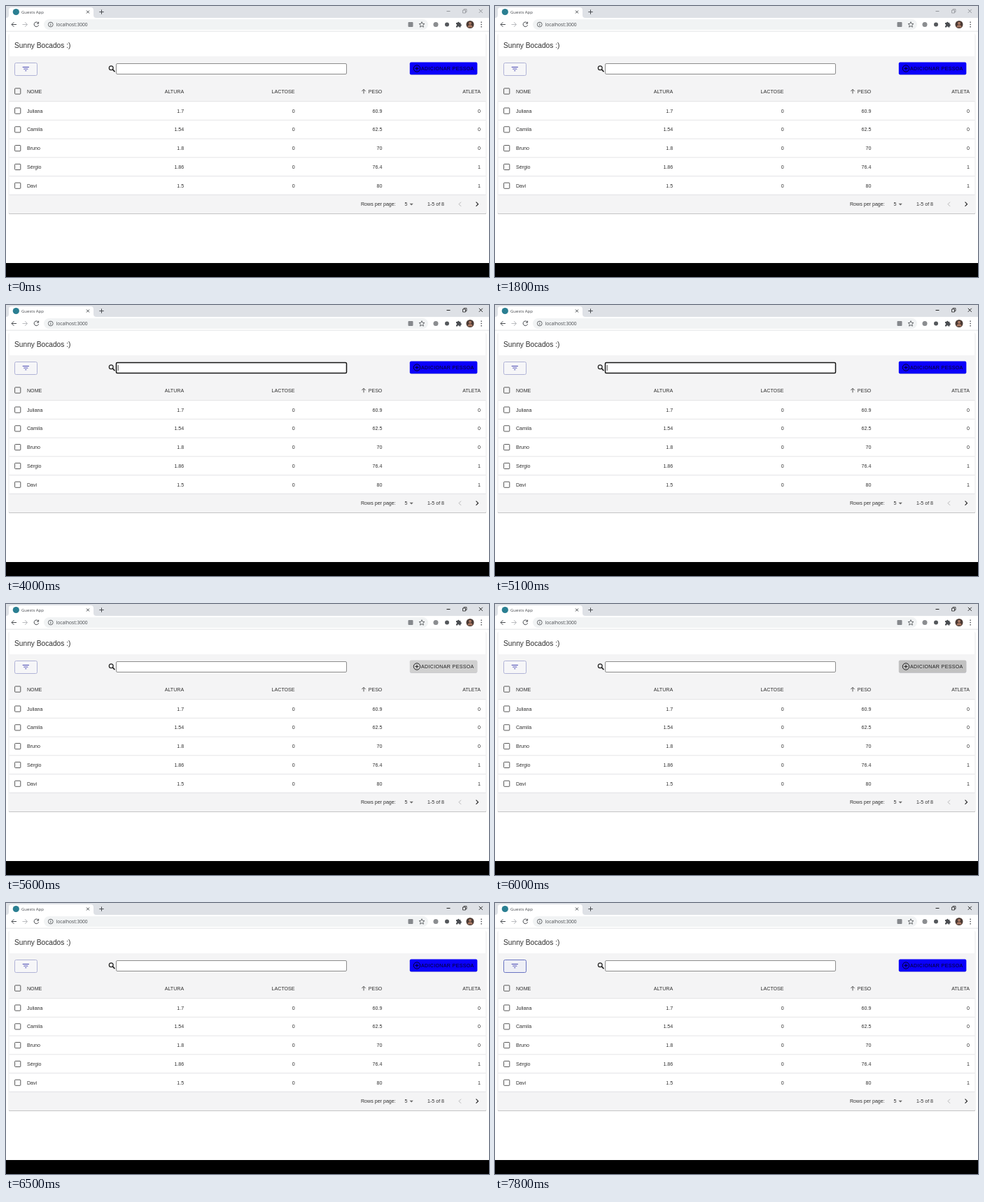
An HTML page that plays this animation: 690 by 388 pixels, repeating every 8000 ms.

```html
<!DOCTYPE html>
<html lang="pt">
<head>
<meta charset="utf-8">
<title>Guests App</title>
<style>
html, body { margin: 0; width: 100%; height: 100%; overflow: hidden; background: #fff; }
svg { display: block; width: 100%; height: 100%; }
text { font: 7.1px "Liberation Sans", Arial, sans-serif; fill: #303030; white-space: pre; }
.chrome { font-family: "Open Sans", sans-serif; fill: #45484c; }
.line { fill: none; stroke: #4a4d51; stroke-width: 1; }
.end { text-anchor: end; }
</style>
</head>
<body>
<svg id="stage" viewBox="0 0 690 388">
  <!-- browser frame -->
  <path fill="#dee1e6" d="M0 0H690V17H0z"/>
  <path fill="#fff" d="M0 17Q4 17 4 13V6Q4 2 8 2H121Q125 2 125 6V13Q125 17 129 17z"/>
  <circle cx="14.3" cy="8.5" r="4.6" fill="#2b7f92"/>
  <text class="chrome" x="22" y="10.8" style="font-size:6px">Guests App</text>
  <path class="line" d="M115 6.5l4 4m0-4l-4 4M133.3 8.5h6.4m-3.2-3.2v6.4"/>
  <g id="controls" class="line">
    <path d="M629.5 7.5h5"/>
    <path d="M652.5 6h4v4h-4zM654 6V4.6h4v4h-1.5" stroke-width=".8"/>
    <path d="M675.8 4.8l5 5m0-5l-5 5"/>
  </g>
  <rect x="54" y="19" width="549" height="15" rx="7.5" fill="#f1f3f4"/>
  <path stroke="#e2e4e6" d="M0 36.2H690"/>
  <path class="line" d="M15 26.5H8m3.3-3.3L8 26.5l3.3 3.3"/>
  <path class="line" style="stroke:#b9bbbe" d="M23.5 26.5h7m-3.3-3.3l3.3 3.3-3.3 3.3"/>
  <path class="line" d="M46 24.2A3.3 3.3 0 1 0 46.6 27.3M46.6 22.7V25.2H44"/>
  <circle class="line" cx="63.8" cy="26.5" r="3.4" style="stroke-width:.8"/>
  <path class="line" d="M63.8 26v2.3m0-4v.9" style="stroke-width:.9"/>
  <text class="chrome" x="71.6" y="28.9" style="font-size:6.7px">localhost:3000</text>
  <rect x="574.5" y="23" width="7" height="7" rx="1" fill="#85888c"/>
  <path class="line" style="stroke-width:.8" d="M594 22.7l1.1 2.6 2.8.2-2.1 1.9.6 2.8-2.4-1.5-2.4 1.5.6-2.8-2.1-1.9 2.8-.2z"/>
  <circle cx="614" cy="26.5" r="3.5" fill="#8b8d90"/>
  <circle cx="630" cy="26.5" r="3" fill="#55585c"/>
  <path id="puzzle" fill="#4a4d51"/>
  <circle cx="663" cy="26.5" r="5.5" fill="#4b3a34"/>
  <path fill="#a97862" d="M663 22.7a2 2 0 0 1 0 4a2 2 0 0 1 0-4M659.5 30.5a3.5 3.3 0 0 1 7 0z"/>
  <path fill="#4a4d51" d="M678.4 22.6h1.4v1.4h-1.4zm0 3.2h1.4v1.4h-1.4zm0 3.2h1.4v1.4h-1.4z"/>

  <!-- card -->
  <rect x="3.5" y="40" width="683" height="258" rx="2" fill="#e9e9ea"/>
  <rect x="4" y="296" width="682" height="1.9" rx="1" fill="#c4c4c5"/>
  <rect x="4.5" y="39" width="681" height="258" rx="2" fill="#fff"/>
  <path fill="#f4f4f5" d="M4.5 72H685.5V136.5H4.5zM4.5 270.3H685.5V297H4.5z"/>
  <text x="12" y="59.7" style="font-size:10.2px">Sunny Bocados :)</text>
  <rect id="filter" x="12.5" y="81.5" width="32" height="18" rx="2"/>
  <path d="M23.7 87.5h9.2m-7.7 2.6h6.2m-4.1 2.6h2" stroke="#4a4ab4" stroke-width="1"/>
  <g class="line" style="stroke:#1c1c1c;stroke-width:1.2">
    <circle cx="150.2" cy="88.8" r="2.9"/>
    <path d="M152.3 90.9l3.2 3.2" stroke-width="1.5"/>
  </g>
  <rect id="field" x="157.5" y="82.5" width="329" height="15" rx="1.5" fill="#fff"/>
  <path id="caret" d="M160.2 86v8" stroke="#222" stroke-width=".8"/>
  <rect x="577" y="81.3" width="96.2" height="17.5" rx="2" fill="#bcbcc4"/>
  <rect id="button" x="576.8" y="80.5" width="96.5" height="17.7" rx="2"/>
  <g opacity=".84">
    <g class="line" style="stroke:#000">
      <circle cx="587" cy="89.5" r="4.7"/>
      <path d="M584.5 89.5h5m-2.5-2.5v5"/>
    </g>
    <text x="593" y="92.1" style="letter-spacing:.045em;fill:#000">ADICIONAR PESSOA</text>
  </g>
  <g id="table"></g>
  <path class="line" style="stroke:#555" d="M511 125.4v-6m-2.7 2.7l2.7-2.7 2.7 2.7"/>

  <!-- pagination -->
  <text x="507" y="286.4">Rows per page:</text>
  <text x="569.6" y="286.4">5</text>
  <path fill="#6a6a6a" d="M576.6 282.8h5.2l-2.6 2.7z"/>
  <text x="602" y="286.4">1-5 of 8</text>
  <path class="line" style="stroke:#b5b5b6" d="M650 280.7l-3 3 3 3"/>
  <path class="line" style="stroke:#222;stroke-width:1.2" d="M671.5 280.7l3 3-3 3"/>
  <path d="M0 368H690V388H0z"/>
</svg>
<script>
const $ = id => document.getElementById(id);

$('puzzle').setAttribute('d', 'M643 24h2a1.3 1.3 0 0 1 2.6 0h1.9v2.1a1.3 1.3 0 0 1 0 2.6v1.8h-2a1.2 1.2 0 0 0-2.4 0h-2.1v-2a1.2 1.2 0 0 0 0-2.4z');

const rows = [
  ['NOME', 'ALTURA', 'LACTOSE', 'PESO', 'ATLETA'],
  ['Juliana', 1.7, 0, 60.9, 0],
  ['Camila', 1.54, 0, 62.5, 0],
  ['Bruno', 1.8, 0, 70, 0],
  ['Sérgio', 1.86, 0, 76.4, 1],
  ['Davi', 1.5, 0, 80, 1]
];
const columns = [30, 254.2, 412.6, 537.4, 678];

$('table').innerHTML = rows.map((cells, i) => {
  const y = i ? 123.3 + 26.78 * i : 122;
  const divider = 136.6 + 26.74 * i;
  return `<rect class="line" x="12.6" y="${y - 4.1}" width="8.2" height="8.2" rx=".8" style="stroke:#585858"/>
    <path d="M4.5 ${divider}H685.5" stroke="#dedee0" stroke-width=".8"/>` +
    cells.map((cell, c) =>
      `<text x="${columns[c]}" y="${y + 2.5}" class="${c ? 'end' : ''}">${cell}</text>`).join('');
}).join('');

const clamp = x => Math.min(1, Math.max(0, x));
const ramp = (t, from, to) => clamp((t - from) / (to - from));
const mix = (a, b, k) => a.map((v, i) => Math.round(v + (b[i] - v) * k));
const BLUE = [11, 0, 250], HOVER = [213, 213, 213], PRESSED = [193, 193, 193];

function draw(now) {
  const t = Math.floor(now % 8000 / 100) * 100;
  const focused = t >= 3700 && t < 5600;
  const caretOn = focused && (t < 4500 || t >= 5000 && t < 5500);
  const hover = ramp(t, 5100, 5300) - ramp(t, 6200, 6400);
  const press = ramp(t, 5500, 5900) - ramp(t, 6000, 6400);
  const filterHover = t >= 7800;

  $('controls').style.stroke = t < 2300 ? '#92959a' : '#222';
  $('field').style.stroke = focused ? '#161616' : '#808080';
  $('field').style.strokeWidth = focused ? 1.5 : .9;
  $('caret').style.display = caretOn ? '' : 'none';
  $('button').style.fill = `rgb(${mix(BLUE, mix(HOVER, PRESSED, press), hover)})`;
  $('filter').style.stroke = filterHover ? '#6973c2' : '#b0b3d6';
  $('filter').style.fill = filterHover ? '#eeeff6' : '#f6f6f8';
  requestAnimationFrame(draw);
}
draw(performance.now());
</script>
</body>
</html>
```
